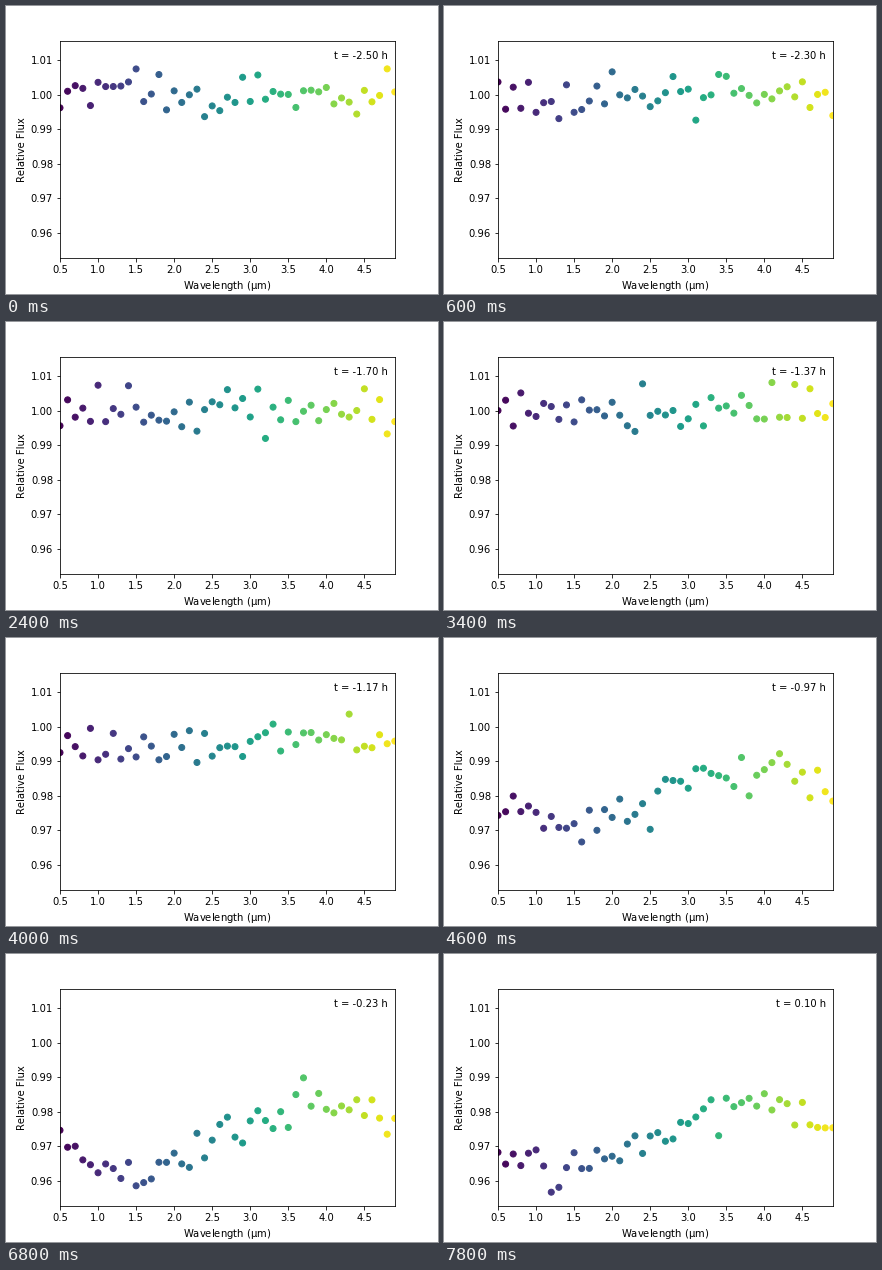
A matplotlib script that plays this animation: 432 px wide and 288 px high, repeating every 8000 ms.

```python
import numpy as np
import matplotlib.pyplot as plt
from matplotlib.animation import FuncAnimation

FRAMES, INTERVAL = 40, 200
SIGMA = 0.0033
SEED = 100

plt.rcParams.update({"font.family": "DejaVu Sans", "font.size": 10,
                     "text.kerning_factor": 6})

wave = 0.5 + 0.1 * np.arange(45)

# Transit depth: one broad absorption wave, deepest at 1.5 μm
depth = 0.0265 + 0.010 * np.cos(np.pi * (wave - 1.5) / 2.35)


def hours(i):
    return -2.5 + i / 15


def ingress(t):
    """Share of the full depth, easing in as the transit begins."""
    u = np.clip((t + 1.3) / 0.48, 0, 1)
    return u * u * (3 - 2 * u)


def flux(i):
    noise = np.random.default_rng(SEED + i).normal(0, SIGMA, wave.size)
    return 1 - depth * ingress(hours(i)) + noise


fig, ax = plt.subplots(figsize=(6, 4), dpi=72)
fig.subplots_adjust(left=0.125, right=0.9, bottom=0.125, top=0.88)
ax.set_xlim(0.5, 4.9)
ax.set_ylim(0.9528, 1.0156)
ax.set_xlabel(r"Wavelength ($\mathrm{\mu m}$)")
ax.set_ylabel("Relative Flux")

dots = ax.scatter(wave, flux(0), c=wave, cmap="viridis")
clock = ax.text(0.98, 0.95, "", transform=ax.transAxes, ha="right", va="top")


def draw(i):
    dots.set_offsets(np.column_stack([wave, flux(i)]))
    clock.set_text(f"t = {hours(i):.2f} h")
    return dots, clock


anim = FuncAnimation(fig, draw, frames=FRAMES, init_func=lambda: draw(0),
                     interval=INTERVAL, repeat=True)
plt.show()
```
